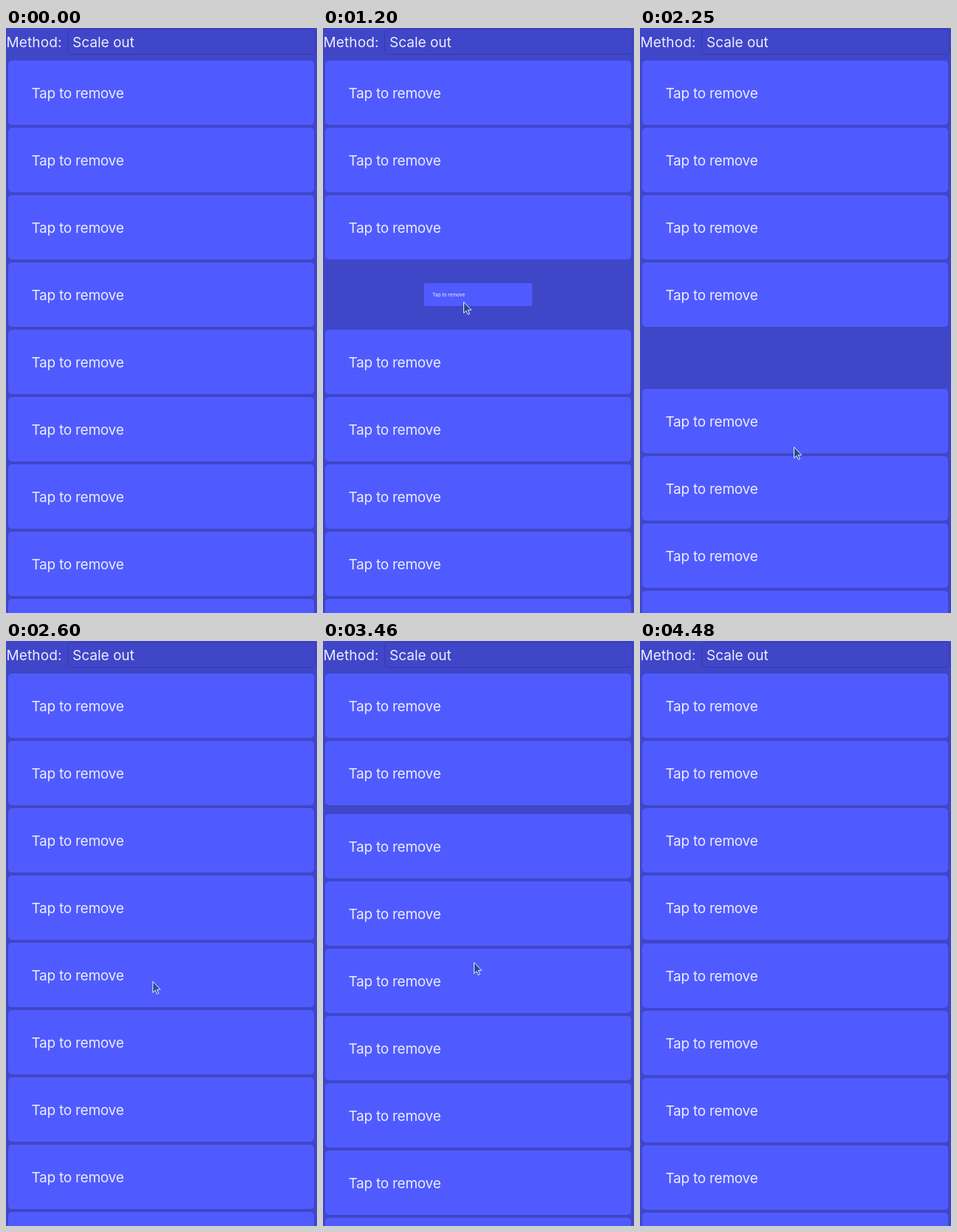
Write an HTML page that moves like this. It is 421 px wide and 791 px high and loops after 4920 ms.

```html
<!DOCTYPE html>
<html lang="en">
<head>
<meta charset="utf-8">
<title>Scale out list</title>
<style>
  html, body { margin: 0; width: 100%; height: 100%; overflow: hidden; background: #4046c8; }
  #stage {
    position: relative; width: 421px; height: 791px; overflow: hidden;
    background: #4046c8; color: #ecedff;
    font: 19px Inter, "Open Sans", sans-serif;
  }
  .label, .select, .row, #ring, #cursor { position: absolute; box-sizing: border-box; white-space: nowrap; }
  .label { left: 0; top: 1px; padding-left: .6px; line-height: 38px; letter-spacing: .1px; }
  .select {
    left: 83px; top: 1px; width: 336px; height: 35px; padding-left: 6px; line-height: 36px;
    border: 1px solid #343aae; border-radius: 5px; background: #4046c8;
  }
  .row {
    left: 3px; top: 44px; width: 414px; height: 87px; padding-left: 31.5px; line-height: 90px;
    border-radius: 5px; background: #505bff; letter-spacing: -.25px;
  }
  #ring { left: -12px; top: -13px; width: 24px; height: 24px; border-radius: 50%; background: rgba(255, 250, 0, .5); }
  #cursor { left: -.5px; top: .5px; overflow: visible; }
</style>
</head>
<body>
<div id="stage">
  <div class="label">Method:</div>
  <div class="select">Scale out</div>
  <div id="list"></div>
  <svg id="cursor" width="12" height="19">
    <path d="M.5 .5V15.5L3.9 12.3 6.2 17.5 8.5 16.5 6.2 11.3H10.8Z" fill="#1d4a78" fill-opacity=".8" stroke="#e6ecff" stroke-width="1"/>
  </svg>
  <div id="ring"></div>
</div>
<script>
  const LOOP = 4920, PITCH = 91;
  const SHRINK = 250, CLOSE = 248;

  // Each tap: row index, pointer press, start of shrinking, start of closing the gap
  const taps = [
    { row: 3, press: 820, shrink: 1000, close: 1250 },
    { row: 4, press: 1920, shrink: 1970, close: 2220 },
    { row: 2, press: 2930, shrink: 2985, close: 3235 },
    { row: 4, press: 3940, shrink: 3997, close: 4235 }
  ];

  // Pointer path: time, x, y
  const path = [
    [150, 372, 782], [570, 190, 369], [1360, 190, 369], [1490, 186, 530],
    [1850, 196, 456], [1970, 196, 456], [2250, 208, 565], [2420, 206, 540],
    [2920, 180, 268], [3060, 180, 268], [3180, 180, 272], [3500, 205, 440],
    [3900, 216, 456], [4000, 216, 456], [4160, 237, 512], [4460, 424, 690]
  ];

  const list = document.getElementById("list");
  const ring = document.getElementById("ring");
  const cursor = document.getElementById("cursor");
  const rows = Array.from({ length: 9 }, () => {
    const row = document.createElement("div");
    row.className = "row";
    row.textContent = "Tap to remove";
    list.append(row);
    return row;
  });

  const clamp = v => Math.min(1, Math.max(0, v));
  const smooth = v => v * v * (3 - 2 * v);
  const move = (el, x, y) => { el.style.transform = `translate(${x}px, ${y}px)`; };

  function pointerAt(t) {
    const i = path.findIndex(p => p[0] > t);
    if (i < 1) return null;
    const [t0, x0, y0] = path[i - 1], [t1, x1, y1] = path[i];
    const k = smooth((t - t0) / (t1 - t0));
    return [x0 + (x1 - x0) * k, y0 + (y1 - y0) * k];
  }

  function draw(time) {
    // The view stalls briefly after the first removal
    const t = time > 1260 && time < 1360 ? 1260 : time;
    const tap = taps.filter(a => t >= a.press).pop();
    const closing = tap && t >= tap.close;
    const gap = closing ? Math.round(PITCH * (1 - clamp((t - tap.close) / CLOSE))) : 0;
    const scale = tap && !closing ? 1 - clamp((t - tap.shrink) / SHRINK) ** 2 : 1;

    rows.forEach((row, i) => {
      const y = PITCH * i + (tap && i >= tap.row ? gap : 0);
      const s = tap && i === tap.row ? scale : 1;
      row.style.transform = `translateY(${y}px) scale(${s})`;
    });

    const pos = pointerAt(t);
    cursor.style.display = pos ? "block" : "none";
    ring.style.display = pos && tap && t < tap.shrink ? "block" : "none";
    if (pos) {
      move(cursor, ...pos);
      move(ring, ...pos);
    }
  }

  const start = performance.now();
  function tick() {
    draw((performance.now() - start) % LOOP);
    requestAnimationFrame(tick);
  }
  tick();
</script>
</body>
</html>
```
